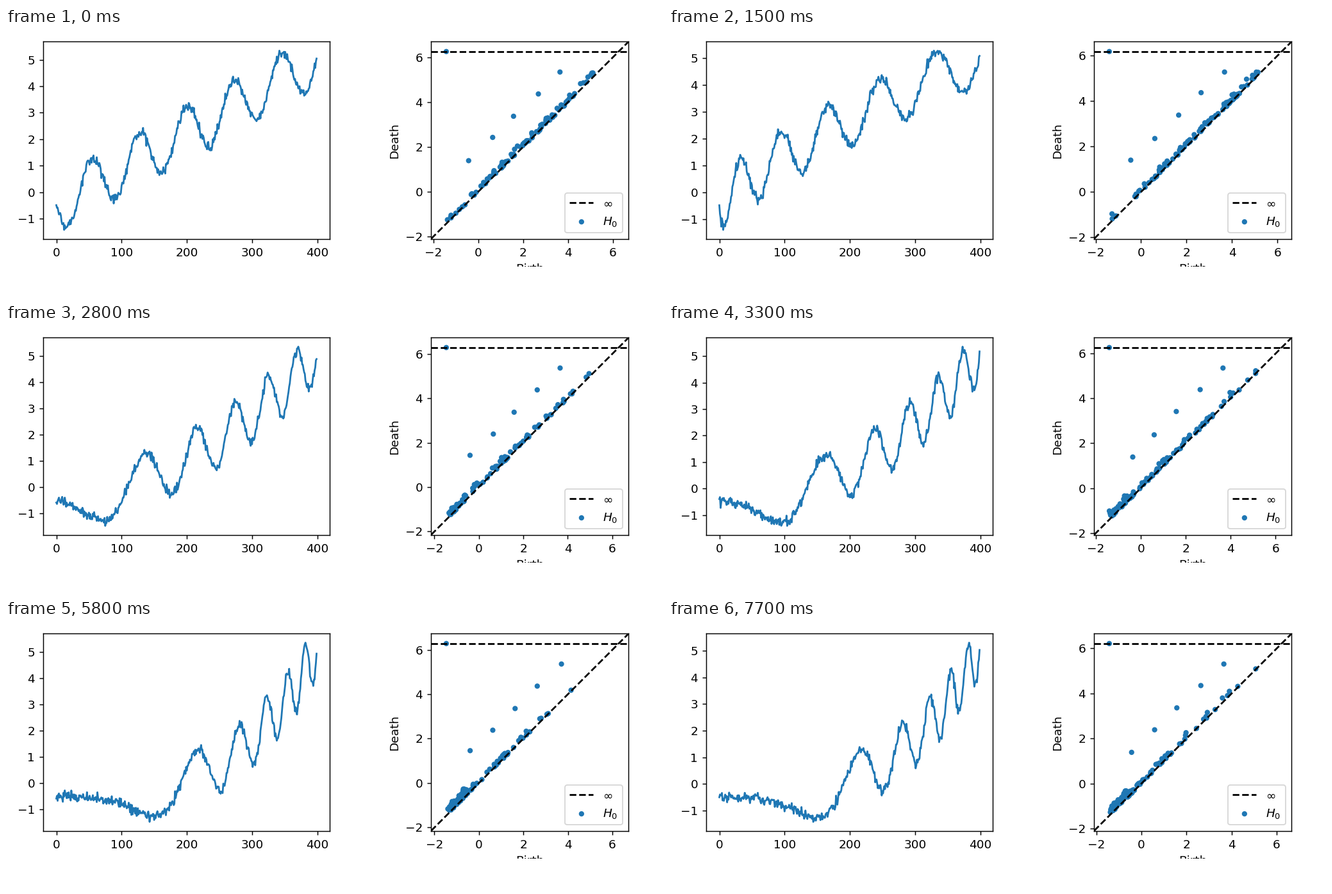
Write a matplotlib script that moves like this. It is 1025 px wide and 419 px high and loops after 8 s.

```python
import numpy as np
import matplotlib.pyplot as plt
from matplotlib.animation import FuncAnimation
from matplotlib.patches import Rectangle
from matplotlib.ticker import MultipleLocator

W, H, DPI = 1025, 419, 133.5
STEP, LOOP = 100, 8000
N, CYCLES, NOISE = 400, 5.5, 0.1

# Times (ms) at which a new series is drawn
STARTS = [0, 700, 1500, 1800, 2300, 2800, 3300, 3700, 4100, 5800, 6400, 6900, 7700]
# The time warp exponent runs linearly between these steps
POWERS = np.interp(range(len(STARTS)), [0, 2, 6, 8, 9], [1, 0.79, 2.2, 2.65, 3.25])

VALLEY = np.arccos(1 / (2 * np.pi)) / (2 * np.pi)  # phase of the first valley


def wave(u):
    return u - 0.5 - np.sin(2 * np.pi * u)


def fit_turns(y, u, turns, sign, rng):
    """Bound the noise at each turn, less on the later, shorter ones."""
    for turn in turns:
        level = wave(turn) + sign * rng.normal(0.17 - 0.019 * turn, 0.025)
        idx = np.flatnonzero(abs(u - turn) < 0.25)
        gap = np.abs(level - y[idx])
        gap[gap.argmin()] = 0
        y[idx] = level - sign * gap


def make_series(step):
    rng = np.random.default_rng(step)
    u = CYCLES * np.linspace(0, 1, N) ** POWERS[step]
    y = wave(u) + NOISE * rng.standard_normal(N).clip(-2.3, 2.3)
    fit_turns(y, u, VALLEY + np.arange(6), -1, rng)
    fit_turns(y, u, 1 - VALLEY + np.arange(5), 1, rng)
    return y


def persistence(y):
    """Finite birth/death pairs of the sublevel sets of y."""
    root, pairs = {}, []

    def find(i):
        while root[i] != i:
            i = root[i]
        return i

    for i in map(int, np.argsort(y)):
        root[i] = i
        for j in (i - 1, i + 1):
            if j in root:
                old, young = sorted((find(i), find(j)), key=lambda k: y[k])
                root[young] = old
                if y[i] - y[young] > 1e-3:
                    pairs.append((y[young], y[i]))
    return pairs


def make_step(step):
    y = make_series(step)
    return y, persistence(y)


def px_axes(left, right, top=21.4, bottom=329.6):
    return fig.add_axes([left / W, 1 - bottom / H, (right - left) / W, (bottom - top) / H])


STEPS = [make_step(i) for i in range(len(STARTS))]

plt.rcParams["font.family"] = "DejaVu Sans"
fig = plt.figure(figsize=(W / DPI, H / DPI), dpi=DPI, facecolor="white")
ax = px_axes(58.2, 504.8)
dgm = px_axes(663.2, 971.2)

curve, = ax.plot(np.arange(N), STEPS[0][0], color="C0")
ax.set_xlim(-0.05 * (N - 1), 1.05 * (N - 1))
ax.xaxis.set_major_locator(MultipleLocator(100))
ax.yaxis.set_major_locator(MultipleLocator(1))

diagonal, = dgm.plot([], [], "--", c="k")
infinity, = dgm.plot([], [], "--", c="k", label=r"$\infty$")
dots = dgm.scatter([], [], s=20, color="C0", edgecolor="none", label="$H_0$")
dgm.set_xlabel("Birth")
dgm.set_ylabel("Death")
dgm.xaxis.set_major_locator(MultipleLocator(2))
dgm.yaxis.set_major_locator(MultipleLocator(2))
dgm.legend(loc="lower right")

# The lower strip is cut off
fig.add_artist(Rectangle((0, 0), 1, 1 - 373 / H, transform=fig.transFigure,
                         fc="white", ec="none", zorder=10))


def draw(frame):
    step = np.searchsorted(STARTS, frame * STEP, side="right") - 1
    y, pairs = STEPS[step]
    lo, hi = y.min(), y.max()
    span = hi - lo
    curve.set_ydata(y)
    ax.set_ylim(lo - 0.05 * span, hi + 0.05 * span)

    low, high = lo - 0.1 * span, hi + 0.2 * span
    top = low + 0.95 * (high - low)
    diagonal.set_data([low, high], [low, high])
    infinity.set_data([low, high], [top, top])
    dots.set_offsets(pairs + [(lo, top)])
    dgm.set_xlim(low, high)
    dgm.set_ylim(low, high)
    return curve, diagonal, infinity, dots


anim = FuncAnimation(fig, draw, frames=LOOP // STEP, interval=STEP,
                     init_func=lambda: draw(0), repeat=True, repeat_delay=0)
plt.show()
```
